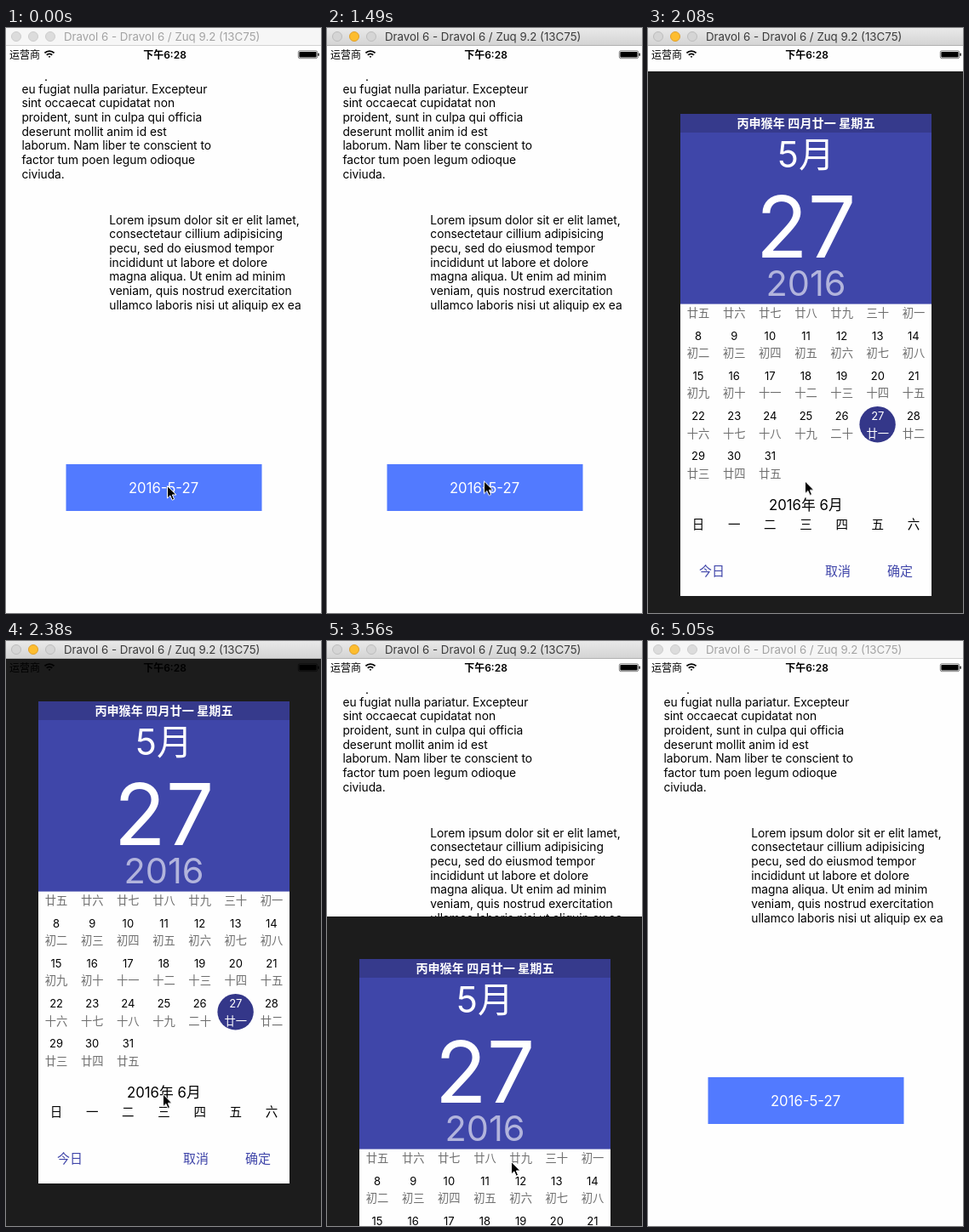
Animation, 370 px wide and 688 px high, one loop 5150 ms. Source, as an HTML page:

```html
<!DOCTYPE html>
<html lang="zh-CN">
<head>
<meta charset="utf-8">
<title>Date picker</title>
<style>
  html, body { margin: 0; width: 100%; height: 100%; overflow: hidden; background: #fefefe; }
  svg { display: block; width: 370px; height: 688px; }
  text { font: 13px Inter, "Noto Sans CJK SC", "Noto Sans CJK", sans-serif; }
  .mid { text-anchor: middle; }
  #title text { font-size: 13.3px; }
  .body { font-size: 13.8px; letter-spacing: -.035px; }
  #status text { font-size: 12px; }
  #status .clock { font-weight: 600; }
  .button { font-size: 16.7px; fill: #fff; }
  .banner { font-size: 14.1px; font-weight: 600; fill: #fff; }
  .month { font-size: 42px; fill: #fff; }
  .year { font-size: 41.5px; fill: #b2b4dc; }
  .day { font-size: 100px; fill: #fff; }
  .lunar { font-size: 13.3px; fill: #6e6e6e; }
  .next { font-size: 16.8px; }
  .week { font-size: 14.5px; }
  .action { font-size: 15px; fill: #3f45a9; }
  .picked { fill: #fff; }
</style>
</head>
<body>
<svg viewBox="0 0 370 688">
  <defs>
    <linearGradient id="chrome" x2="0" y2="1">
      <stop stop-color="#e9e9e9"/><stop offset="1" stop-color="#d3d3d3"/>
    </linearGradient>
    <clipPath id="list"><rect x="38" y="274" width="295" height="343"/></clipPath>
  </defs>

  <rect width="370" height="688" fill="#fefefe"/>
  <g id="page">
    <rect x="46" y="60.5" width="2" height="1.5" fill="#333"/>
    <rect x="70.5" y="513" width="230" height="55" fill="#527aff"/>
    <text class="button mid" x="185" y="546.5">2016-5-27</text>
  </g>

  <g id="sheet">
    <rect width="370" height="667" fill="#1c1c1c"/>
    <rect x="38" y="50" width="295" height="567" fill="#fefefe"/>
    <g id="days" clip-path="url(#list)">
      <circle cx="269.6" cy="415.2" r="21.2" fill="#343789"/>
    </g>
    <rect x="38" y="50" width="295" height="223.6" fill="#3f46a9"/>
    <rect x="38" y="50" width="295" height="22" fill="#363a8c"/>
    <text class="banner mid" x="185.5" y="66">丙申猴年 四月廿一 星期五</text>
    <text class="month mid" x="185.5" y="112.5">5月</text>
    <text class="day mid" x="185.5" y="219">27</text>
    <text class="year mid" x="185.5" y="263.5">2016</text>
  </g>

  <g id="status">
    <text x="4" y="35.5">运营商</text>
    <g fill="none" stroke="#000" stroke-width="1.9">
      <path d="M45.4 29.4A8 8 0 0 1 56.6 29.4M47.8 31.8A4.6 4.6 0 0 1 54.2 31.8"/>
      <path d="M51 35L49.6 33.6A2 2 0 0 1 52.4 33.6Z" fill="#000" stroke="none"/>
    </g>
    <text class="clock mid" x="186.5" y="35.5">下午6:28</text>
    <rect x="343.3" y="26.8" width="22.4" height="8.9" rx="1.8" fill="none" stroke="#000" stroke-width=".5"/>
    <rect x="344.4" y="27.9" width="20.2" height="6.7" rx=".8"/>
    <rect x="366.4" y="29.6" width="1.3" height="3.3" rx=".6"/>
  </g>

  <g id="title">
    <rect width="370" height="21" fill="#f6f6f6"/>
    <rect y="20" width="370" height="1" fill="#d2d2d2"/>
    <g fill="#dcdcdc" stroke="#cdcdcd">
      <circle cx="12" cy="10" r="5.5"/><circle cx="32" cy="10" r="5.5"/><circle cx="52" cy="10" r="5.5"/>
    </g>
    <text x="68" y="15" fill="#a3a3a3">Dravol 6 - Dravol 6 / Zuq 9.2 (13C75)</text>
    <g id="active">
      <rect width="370" height="21" fill="url(#chrome)"/>
      <rect y="20" width="370" height="1" fill="#b1b1b1"/>
      <g fill="#d5d5d5" stroke="#bdbdbd">
        <circle cx="12" cy="10" r="5.5"/><circle cx="52" cy="10" r="5.5"/>
        <circle cx="32" cy="10" r="5.5" fill="#fdbd2f" stroke="#e0a02c"/>
      </g>
      <text x="68" y="15" fill="#3b3b3b">Dravol 6 - Dravol 6 / Zuq 9.2 (13C75)</text>
    </g>
  </g>

  <path id="cursor" d="M.5 .5V15L3.9 11.9 6.2 17.2 8.6 16.2 6.3 11H10.9Z" stroke="#fff" stroke-width="1"/>
</svg>
<script>
const LOOP = 5150;
const $ = id => document.getElementById(id);

function label(parent, str, x, y, cls) {
  const el = document.createElementNS('http://www.w3.org/2000/svg', 'text');
  el.setAttribute('x', x);
  el.setAttribute('y', y);
  el.setAttribute('class', cls);
  el.textContent = str;
  parent.append(el);
}

function paragraph(lines, x, y) {
  lines.forEach((line, i) => label($('page'), line, x, y + i * 16.67, 'body'));
}

paragraph([
  'eu fugiat nulla pariatur. Excepteur',
  'sint occaecat cupidatat non',
  'proident, sunt in culpa qui officia',
  'deserunt mollit anim id est',
  'laborum. Nam liber te conscient to',
  'factor tum poen legum odioque',
  'civiuda.'
], 18.4, 76.8);

paragraph([
  'Lorem ipsum dolor sit er elit lamet,',
  'consectetaur cillium adipisicing',
  'pecu, sed do eiusmod tempor',
  'incididunt ut labore et dolore',
  'magna aliqua. Ut enim ad minim',
  'veniam, quis nostrud exercitation',
  'ullamco laboris nisi ut aliquip ex ea'
], 121.3, 230.8);

// Lunar day name for a day of May 2016.
function lunar(day) {
  const n = (day + 23) % 30;
  if (n === 19) return '二十';
  if (n === 29) return '三十';
  return '初十廿'[Math.floor(n / 10)] + '一二三四五六七八九十'[n % 10];
}

const column = i => 38 + 295 / 7 * (i + .5);

for (let day = 1; day <= 31; day++) {
  const x = column((day - 1) % 7);
  const y = 269 + 47.1 * Math.floor((day - 1) / 7);
  const picked = day === 27 ? ' picked' : '';
  label($('days'), day, x, y, 'mid' + picked);
  label($('days'), lunar(day), x, y + 20.2, 'mid lunar' + picked);
}
label($('days'), '2016年 6月', 185.3, 516, 'next mid');
[...'日一二三四五六'].forEach((d, i) => label($('days'), d, column(i), 538.2, 'week mid'));
[['今日', 75], ['取消', 223], ['确定', 296]]
  .forEach(([name, x]) => label($('days'), name, x, 593, 'action mid'));

// Each step [time, ...values] holds until the next one.
function hold(id, steps, style) {
  const frames = steps.map(([t, ...v]) => ({ offset: t / LOOP, easing: 'step-end', ...style(...v) }));
  frames.push({ ...frames[frames.length - 1], offset: 1 });
  $(id).animate(frames, { duration: LOOP, iterations: Infinity });
}

const move = (x, y) => ({ transform: `translate(${x}px, ${y}px)` });

hold('active', [[0, 0], [1490, 1], [5050, 0]], opacity => ({ opacity }));

hold('sheet', [
  [0, 688], [1930, 241], [2080, 51], [2230, 25], [2380, 21],
  [3560, 324], [3710, 648], [3860, 685], [4010, 688]
], y => move(0, y));

hold('cursor', [
  [0, 189, 538], [450, 189, 537], [1050, 189, 535], [1190, 184.5, 533], [1340, 184, 532.5],
  [2680, 188, 538], [2820, 202, 560], [2970, 212, 591], [3120, 213, 610], [3270, 215, 612.5],
  [3410, 216, 612], [4160, 240, 640], [4300, 277, 664], [4450, 308, 683], [4600, 308, 700]
], move);
</script>
</body>
</html>
```
